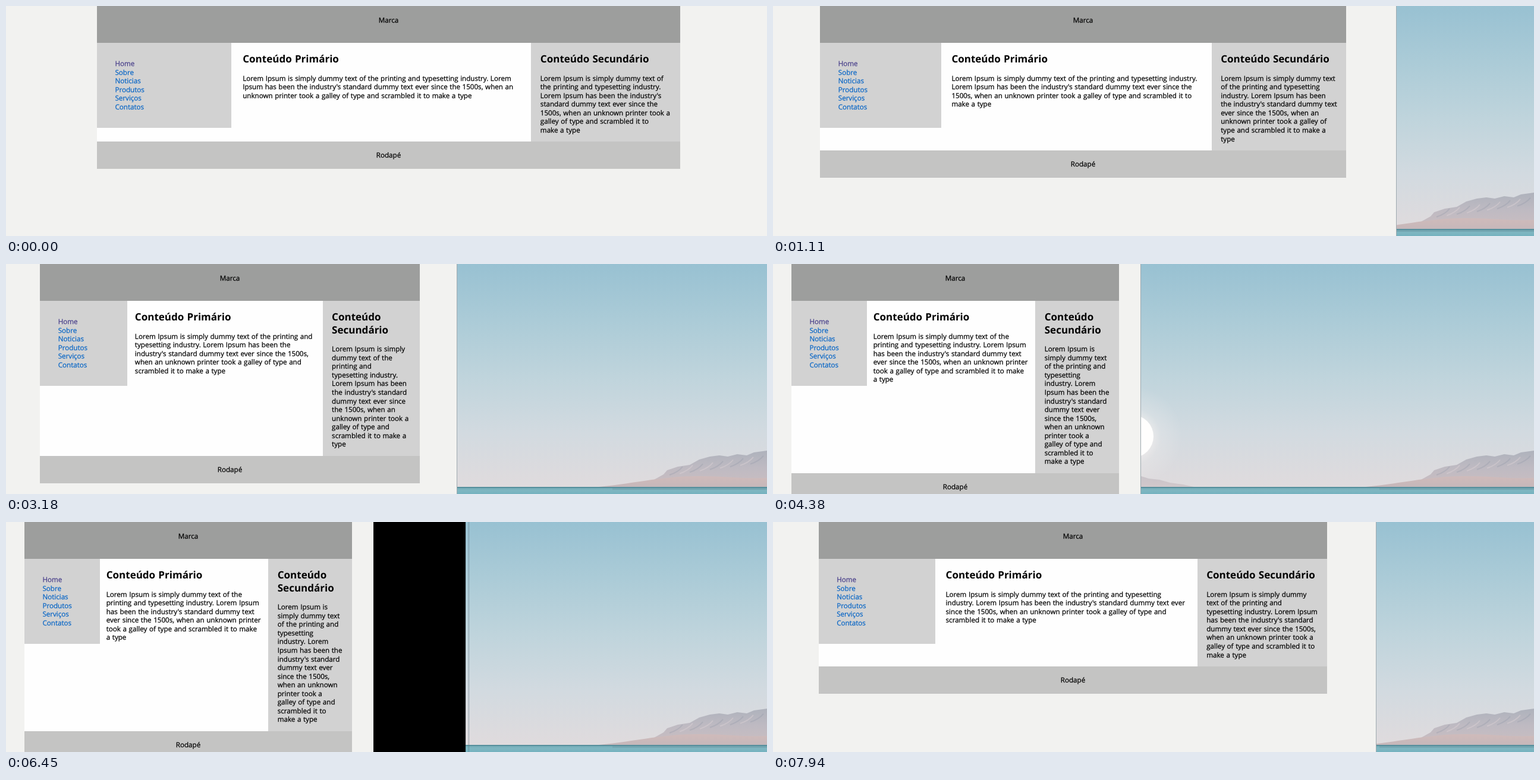
Write an HTML page with a canvas that moves like this. It is 1280x387 px and loops after 8000 ms.

```html
<!DOCTYPE html>
<html lang="pt">
<head>
<meta charset="utf-8">
<title>Layout responsivo</title>
<style>
  html, body { margin: 0; width: 100%; height: 100%; overflow: hidden; background: #f2f2f0; }
  canvas { display: block; }
</style>
</head>
<body>
<canvas id="stage" width="1280" height="387"></canvas>
<script>
const W = 1280, H = 387, LOOP = 8000;
const ctx = document.getElementById('stage').getContext('2d');
const FONT = '"Open Sans", "Noto Sans", sans-serif';
const LINE = 14.56, HEAD_LINE = 21.6, BODY_EM = 12.21;

const LOREM = "Lorem Ipsum is simply dummy text of the printing and typesetting industry. " +
  "Lorem Ipsum has been the industry's standard dummy text ever since the 1500s, " +
  "when an unknown printer took a galley of type and scrambled it to make a type";
const MENU = ['Home', 'Sobre', 'Noticias', 'Produtos', 'Serviços', 'Contatos'];

// Letter advances in 1/1000 em, used only to decide where lines break
const ADVANCE = {
  ' ': 301, a: 525, b: 600, c: 495, d: 557, e: 545, f: 370, g: 540, h: 567, i: 285,
  k: 560, l: 295, m: 830, n: 547, o: 537, p: 557, r: 389, s: 405, t: 396, u: 547,
  v: 490, w: 744, x: 501, y: 493, I: 278, L: 507, ',': 367, '.': 280, "'": 160
};

// Each drag moves the window edge in steps; the page reflows at `settle`
const START_EDGE = 1293;
const DRAGS = [
  { start: 500,  steps: 5, pace: 70, first: 1245, last: 1049, settle: 1110, edge: 1049 },
  { start: 2630, steps: 6, pace: 70, first: 1007, last: 759,  settle: 3180, edge: 759 },
  { start: 4040, steps: 3, pace: 70, first: 711,  last: 619,  settle: 4380, edge: 619 },
  { start: 6040, steps: 7, pace: 68, first: 632,  last: 778,  settle: 6520, edge: 779 },
  { start: 7440, steps: 7, pace: 70, first: 794,  last: 1012, settle: 7940, edge: 1015 }
];

function rect(x, y, w, h, color) {
  const left = Math.round(x), top = Math.round(y);
  ctx.fillStyle = color;
  ctx.fillRect(left, top, Math.round(x + w) - left, Math.round(y + h) - top);
}

function vertical(y0, y1, ...colors) {
  const g = ctx.createLinearGradient(0, y0, 0, y1);
  colors.forEach((c, i) => g.addColorStop(i / (colors.length - 1), c));
  return g;
}

function shape(points, fill) {
  ctx.beginPath();
  points.forEach(([x, y]) => ctx.lineTo(x, y));
  ctx.closePath();
  ctx.fillStyle = fill;
  ctx.fill();
}

// A hairline stroke gives the body text its slightly heavier colour
function text(str, x, y, color = '#000', align = 'left') {
  ctx.font = '11.6px ' + FONT;
  ctx.wordSpacing = '0.6px';
  ctx.textAlign = align;
  ctx.fillStyle = ctx.strokeStyle = color;
  ctx.lineWidth = 0.25;
  ctx.fillText(str, x, y);
  ctx.strokeText(str, x, y);
}

function heading(str, x, y) {
  ctx.font = 'bold 17px ' + FONT;
  ctx.wordSpacing = '0.8px';
  ctx.textAlign = 'left';
  ctx.fillStyle = '#000';
  ctx.fillText(str, x, y);
}

function advance(str) {
  let sum = 0;
  for (const ch of str) sum += ADVANCE[ch] || 524;
  return sum * BODY_EM / 1000;
}

function wrap(str, width) {
  const lines = [];
  let line = '';
  for (const word of str.split(' ')) {
    const longer = line ? line + ' ' + word : word;
    if (line && advance(longer) > width) {
      lines.push(line);
      line = word;
    } else {
      line = longer;
    }
  }
  return [...lines, line];
}

function paragraph(lines, x, y) {
  lines.forEach((line, i) => text(line, x, y + i * LINE));
}

function drawWallpaper() {
  rect(0, 0, W, H, vertical(0, 378, '#98c1d2', '#abcbd7', '#bfd4dc', '#d2dae0', '#e0dbdd'));

  const glow = ctx.createRadialGradient(604, 290, 32, 604, 290, 85);
  glow.addColorStop(0, 'rgba(255,248,244,.5)');
  glow.addColorStop(0.3, 'rgba(255,248,244,.2)');
  glow.addColorStop(1, 'rgba(255,248,244,0)');
  rect(500, 190, 210, 190, glow);
  ctx.beginPath();
  ctx.arc(604, 290, 36, 0, 7);
  ctx.fillStyle = '#fffefd';
  ctx.fill();

  shape([[590, 352], [619, 357], [632, 361], [650, 363], [668, 368], [690, 371], [708, 375], [590, 375]],
    vertical(352, 376, '#c6c3c9', '#d2c8cb'));

  // Far ridge with a few soft folds
  shape([[1062, 376], [1088, 364], [1106, 354], [1112, 347], [1130, 341], [1150, 338], [1166, 329],
    [1184, 324], [1200, 322], [1214, 324], [1230, 320], [1246, 322], [1258, 317], [1280, 314], [1280, 376]],
    vertical(314, 370, '#aeb2bc', '#bebac2', '#c9bdc1'));
  ctx.lineWidth = 2;
  for (let i = 0; i < 9; i++) {
    const x = 1138 + i * 17, y = 341 - i * 2.3;
    ctx.strokeStyle = i % 2 ? 'rgba(218,208,212,.5)' : 'rgba(142,150,164,.3)';
    ctx.beginPath();
    ctx.moveTo(x, y);
    ctx.quadraticCurveTo(x - 7, y + 9, x - 22, y + 14);
    ctx.stroke();
  }

  // Near slope
  ctx.beginPath();
  ctx.moveTo(985, 376);
  ctx.bezierCurveTo(1050, 371, 1100, 357, 1165, 357);
  ctx.bezierCurveTo(1210, 357, 1240, 362, 1280, 360);
  ctx.lineTo(1280, 376);
  ctx.fillStyle = vertical(356, 376, '#d0bbba', '#c5b7ba');
  ctx.fill();

  rect(0, 375, W, 12, vertical(375, 387, '#6fa8b4', '#7fb6c1', '#74b2bf'));
  rect(0, 375, W, 2, '#568f9c');
  rect(1020, 377, 260, 3, 'rgba(95,130,142,.25)');
}

function drawPage(edge) {
  const view = edge - 6;
  const width = Math.min(981, view * (view > 700 ? 0.848 : 0.899));
  const left = (view - width) / 2;
  const middle = view / 2;
  const sideX = left + width * 0.7445;
  const sideWidth = width * 0.2545 - 30;
  const oneLine = sideWidth > 183;
  const shift = oneLine ? 0 : HEAD_LINE;
  const sideLines = wrap(LOREM, sideWidth);
  const bottom = 126.4 + sideLines.length * LINE + shift;

  rect(0, 0, edge, H, '#f2f2f0');
  rect(left, 0, width, 62, '#9d9e9d');
  rect(left, 62, width, bottom - 62, '#fefefe');
  rect(left, 62, width * 0.23, 142.6, '#d2d2d2');
  rect(sideX, 62, left + width - sideX, bottom - 62, '#d2d2d2');
  rect(left, bottom, width, 46, '#c4c4c3');

  text('Marca', middle, 28, '#000', 'center');
  text('Rodapé', middle, bottom + 27, '#000', 'center');
  MENU.forEach((item, i) =>
    text(item, left + 30.5, 101 + i * LINE, i ? '#0866c6' : '#483f8a'));

  const mainX = left + width * 0.25;
  heading('Conteúdo Primário', mainX, 95);
  paragraph(wrap(LOREM, width * 0.478), mainX, 125.6);

  const textX = sideX + 15.5;
  if (oneLine) {
    heading('Conteúdo Secundário', textX, 95);
  } else {
    heading('Conteúdo', textX, 95);
    heading('Secundário', textX, 95 + HEAD_LINE);
  }
  paragraph(sideLines, textX, 125.6 + shift);
}

function stateAt(t) {
  let edge = START_EDGE;
  for (const d of DRAGS) {
    if (t < d.start) break;
    if (t < d.settle) {
      const step = Math.min(d.steps - 1, Math.floor((t - d.start) / d.pace));
      const p = step / (d.steps - 1);
      const eased = p * (1.6 - 0.6 * p);
      return { edge, drag: d.first + (d.last - d.first) * eased, step };
    }
    edge = d.edge;
  }
  return { edge, drag: null, step: 0 };
}

function edgeLine(x) {
  rect(x - 1, 0, 1, H, 'rgba(90,110,122,.55)');
}

function draw(t) {
  const { edge, drag, step } = stateAt(t);
  const growing = drag !== null && drag > edge;
  const visible = drag === null || growing ? edge : drag - 4;

  drawWallpaper();
  ctx.save();
  ctx.beginPath();
  ctx.rect(0, 0, Math.round(visible), H);
  ctx.clip();
  drawPage(edge);
  ctx.restore();

  edgeLine(edge);
  if (drag === null) return;
  if (!growing) {
    edgeLine(drag);
  } else if (step === 0) {
    rect(drag - 3, 0, 3, H, '#35302d');
  } else {
    rect(edge - 1, 0, drag - 4 - edge, H, '#000');
    edgeLine(drag + 1);
  }
}

ctx.textRendering = 'geometricPrecision';

function tick() {
  draw(performance.now() % LOOP);
  requestAnimationFrame(tick);
}
tick();
</script>
</body>
</html>
```
